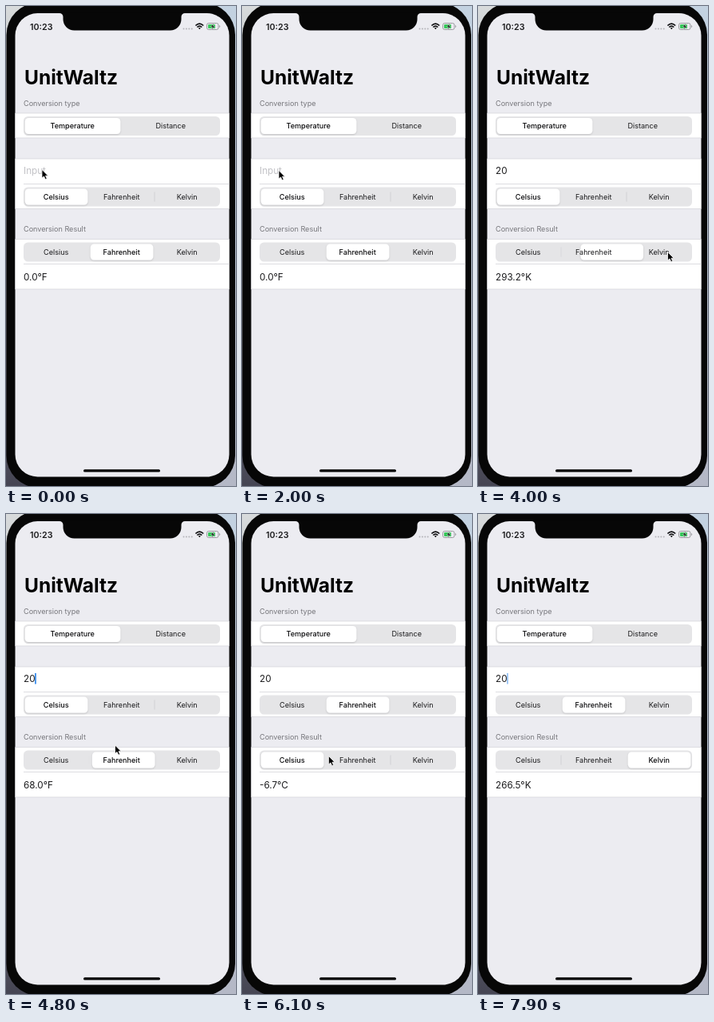
Write an HTML page that moves like this. It is 288x600 px and loops after 8000 ms.

```html
<!DOCTYPE html>
<html lang="en">
<head>
<meta charset="utf-8">
<title>Unit converter</title>
<style>
  html, body { margin: 0; width: 100%; height: 100%; overflow: hidden; background: #000; }
  svg { display: block; width: 288px; height: 600px; }
  text { font-family: Inter, Roboto, sans-serif; fill: #1a1a1c; }
  .label { font-size: 9.1px; fill: #77777c; }
  .value { font-size: 11.7px; }
  .seg { font-size: 9.1px; text-anchor: middle; }
  .seg.on { font-weight: 500; fill: #0b0b0d; }
</style>
</head>
<body>
<svg id="stage" viewBox="0 0 288 600" xmlns="http://www.w3.org/2000/svg">
  <defs>
    <linearGradient id="deskLeft" x2="0" y2="1">
      <stop offset="0" stop-color="#d8dbdc"/>
      <stop offset="1" stop-color="#454553"/>
    </linearGradient>
    <linearGradient id="deskRight" x2="0" y2="1">
      <stop offset="0" stop-color="#c3d2e1"/>
      <stop offset="1" stop-color="#b4b8c6"/>
    </linearGradient>
    <filter id="lift" x="-10%" y="-30%" width="120%" height="170%">
      <feDropShadow dx="0" dy="1" stdDeviation="1.1" flood-opacity=".16"/>
    </filter>
  </defs>
  <rect width="144" height="600" fill="url(#deskLeft)"/>
  <rect x="144" width="144" height="600" fill="url(#deskRight)"/>
  <rect x=".5" y="-4" width="286.5" height="606" rx="40" fill="#070707"/>
  <rect x="11.5" y="9" width="268" height="579.5" rx="28" fill="#ececf1"/>
  <path d="M67 8.500V9A4.500 4.500 0 0 1 71.500 13.500V16.500A14 14 0 0 0 85.500 30.500H205.500A14 14 0 0 0 219.500 16.500V13.500A4.500 4.500 0 0 1 224 9V8.500Z" fill="#070707"/>

  <text x="30" y="29.500" font-size="10.700" font-weight="600">10:23</text>
  <g fill="#b5b5ba">
    <circle cx="222.500" cy="28.500" r="1"/><circle cx="225.900" cy="28.500" r="1"/>
    <circle cx="229.300" cy="28.500" r="1"/><circle cx="232.700" cy="28.500" r="1"/>
  </g>
  <g fill="none" stroke="#0b0b0d" stroke-width="1.700">
    <path d="M237.400 24.500Q242.300 19.800 247.200 24.500M239.300 26.500Q242.300 23.700 245.300 26.500"/>
    <path d="M240.800 27.600Q242.300 26.500 243.800 27.600L242.300 29.300Z" fill="#0b0b0d" stroke="none"/>
  </g>
  <rect x="251.500" y="21.500" width="14.500" height="8" rx="2.300" fill="none" stroke="#9a9a9e"/>
  <rect x="253" y="23" width="9" height="5" rx="1" fill="#35c759"/>
  <path d="M267.200 24v3q1-.4 1-1.500t-1-1.500Z" fill="#9a9a9e"/>
  <path d="M260.200 21.800L256.300 26H258.500L257.500 29.400L261.500 25H259.200Z" fill="#0b0b0d" stroke="#fff" stroke-width=".4"/>

  <text x="23" y="98" font-size="24.500" font-weight="700" style="fill:#000">UnitWaltz</text>
  <text class="label" x="22" y="125">Conversion type</text>
  <text class="label" x="22" y="282">Conversion Result</text>
  <g id="form"></g>
  <text id="entry" class="value" x="22" y="210"></text>
  <text id="result" class="value" x="22" y="343"></text>
  <rect id="caret" y="198.800" width="1.500" height="14" rx=".7" fill="#1477e8"/>
  <rect x="97" y="579.300" width="96" height="3.300" rx="1.650" fill="#000"/>
  <path id="pointer" d="M0 0V10.600L2.500 8.400L4.300 12.200L6.200 11.300L4.500 7.700H7.700Z"
        fill="#000" stroke="#fff" stroke-width=".8" stroke-linejoin="round"/>
</svg>
<script>
const LOOP = 8000;
const LEFT = 22, WIDTH = 246, SLIDE = 280;
const UNITS = ["Celsius", "Fahrenheit", "Kelvin"];
const SIGNS = ["°C", "°F", "°K"];

// [time, selected index]
const FROM_TAPS = [[-SLIDE, 0], [5210, 1]];
const TO_TAPS = [[-SLIDE, 1], [3904, 2], [4548, 1], [5610, 0], [6680, 2]];
const TYPED = [[0, ""], [2250, "2"], [2480, "20"]];

// [time, x, y]
const PATH = [
  [150, 45, 204.5], [400, 46, 205.5], [2150, 46, 205.5], [2450, 39, 205],
  [3050, 39, 205], [3750, 237.5, 307.5], [4120, 237.5, 307.5], [4450, 148, 307],
  [4550, 147, 306], [4790, 136.5, 289], [4850, 136.5, 289], [5150, 140, 240],
  [5250, 140, 240], [5570, 72, 302], [5880, 72, 302], [6550, 215, 304], [6650, 217, 305]
];
const POINTER_GONE = 7100;

const svgNS = "http://www.w3.org/2000/svg";
const $ = id => document.getElementById(id);
const clamp = v => Math.max(0, Math.min(1, v));
const smooth = v => (v = clamp(v), v * v * (3 - 2 * v));
const mix = (a, b, k) => a + (b - a) * k;

function add(parent, tag, attrs, text = "") {
  const el = document.createElementNS(svgNS, tag);
  for (const key in attrs) el.setAttribute(key, attrs[key]);
  el.textContent = text;
  parent.append(el);
  return el;
}

function box(x, y, width, height, fill, rx = 0) {
  return add($("form"), "rect", { x, y, width, height, fill, rx });
}

function card(y, height) {
  box(11.5, y, 268, height, "#fff");
  box(11.5, y - .4, 268, .7, "#d2d2d7");
  box(11.5, y + height - .4, 268, .7, "#d2d2d7");
}

function picker(y, names) {
  const step = WIDTH / names.length;
  box(LEFT, y, WIDTH, 24, "#e5e5e7", 5.5);
  const lines = names.slice(1).map((_, i) =>
    box(LEFT + step * (i + 1) - .4, y + 6, .8, 12, "#cdcdd1"));
  const pill = box(0, y + 2, step - 3.5, 20, "#fff", 4.5);
  pill.setAttribute("filter", "url(#lift)");
  const labels = names.map((name, i) =>
    add($("form"), "text", { x: LEFT + step * (i + .5) - .3, y: y + 15.3, class: "seg" }, name));

  return pos => {
    pill.setAttribute("x", LEFT + 1.8 + step * pos);
    lines.forEach((line, i) =>
      line.setAttribute("opacity", clamp(Math.abs(pos - i - .5) * 2 - 1)));
    labels.forEach((label, i) =>
      label.setAttribute("class", Math.abs(pos - i) < .1 ? "seg on" : "seg"));
  };
}

card(134, 31);
card(191, 62.5);
card(291.5, 62.5);
box(LEFT, 222, 257.5, .7, "#cfcfd4");
box(LEFT, 322.3, 257.5, .7, "#cfcfd4");
const setType = picker(138, ["Temperature", "Distance"]);
const setFrom = picker(226.5, UNITS);
const setTo = picker(295.5, UNITS);
setType(0);

const latest = (list, t) => list.filter(item => item[0] <= t).pop();

function selection(taps, t) {
  const [start, index] = latest(taps, t);
  const previous = latest(taps, start - 1) || taps[0];
  return { index, pos: mix(previous[1], index, smooth((t - start) / SLIDE)) };
}

function pointerAt(t) {
  const next = PATH.findIndex(p => p[0] > t);
  if (next === 0) return PATH[0].slice(1);
  if (next < 0) return PATH[PATH.length - 1].slice(1);
  const [t0, x0, y0] = PATH[next - 1], [t1, x1, y1] = PATH[next];
  const k = smooth((t - t0) / (t1 - t0));
  return [mix(x0, x1, k), mix(y0, y1, k)];
}

function caretAt(t) {
  if (t < 2200) return smooth((t - 600) / 150) * (1 - smooth((t - 1080) / 200));
  if (t < 2820) return 1;
  const phase = (t - 2820) % 1000;
  return phase < 500 ? 1 - smooth(phase / 170) : smooth((phase - 500) / 170);
}

function convert(entry, from, to) {
  if (!entry) return "0.0" + SIGNS[to];
  const v = Number(entry);
  const celsius = [v, (v - 32) / 1.8, v - 273.15][from];
  const out = [celsius, celsius * 1.8 + 32, celsius + 273.15][to];
  return (Math.round(out * 10 + 1e-6) / 10).toFixed(1) + SIGNS[to];
}

function draw(t) {
  const from = selection(FROM_TAPS, t), to = selection(TO_TAPS, t);
  const entry = latest(TYPED, t)[1];
  setFrom(from.pos);
  setTo(to.pos);

  $("entry").textContent = entry || "Input";
  $("entry").style.fill = entry ? "#1a1a1c" : "#c2c2c6";
  $("result").textContent = convert(entry, from.index, to.index);

  const width = entry ? $("entry").getComputedTextLength() : 0;
  $("caret").setAttribute("x", LEFT + width - .3);
  $("caret").setAttribute("opacity", caretAt(t));

  $("pointer").setAttribute("transform", `translate(${pointerAt(t)})`);
  $("pointer").setAttribute("opacity", t < POINTER_GONE ? 1 : 0);
}

const begin = performance.now();
function tick() {
  draw((performance.now() - begin) % LOOP);
  requestAnimationFrame(tick);
}
tick();
</script>
</body>
</html>
```
